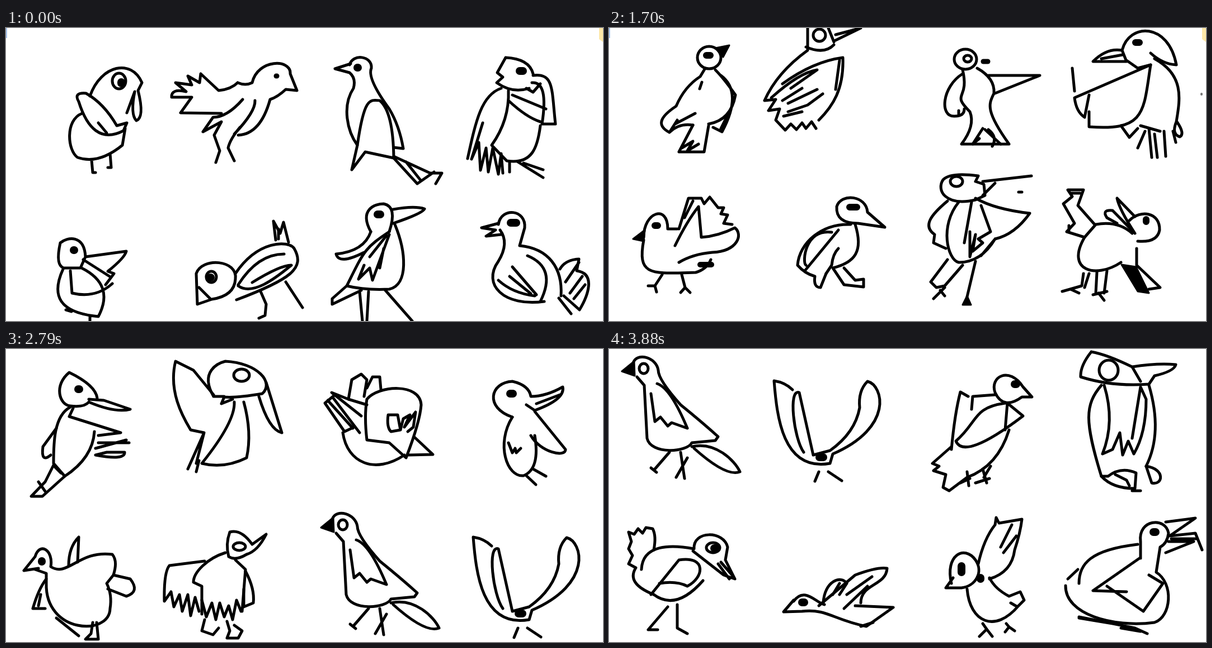
Recreate the animation shown at these times as an HTML page without scripts. Size 1067 by 525 pixels, loop 4320 ms.

```html
<!DOCTYPE html>
<html lang="en">
<head>
<meta charset="utf-8">
<title>Bird doodles</title>
<style>
html, body { margin: 0; width: 100%; height: 100%; overflow: hidden; background: #fff; }
svg { display: block; }
path, ellipse { fill: none; stroke: #000; stroke-width: 5; stroke-linecap: round; stroke-linejoin: round; }
.dot { stroke-width: 14; }
.solid { fill: #000; stroke-width: 3; }
.strip { animation: flip 4.32s step-end infinite; }
@keyframes flip {
  0% { transform: translateY(0); }
  24.3056% { transform: translateY(-525px); }
  49.537% { transform: translateY(-1050px); }
  74.7685%, 100% { transform: translateY(-1575px); }
}
</style>
</head>
<body>
<svg width="100%" height="100%" viewBox="0 0 1067 525">
<defs>
  <g id="corners">
    <path d="M0 0v18" style="stroke:#a9c6ee;stroke-width:4;stroke-linecap:butt"/>
    <path d="M1060 0h7v25l-7-5z" style="fill:#fde8a8;stroke:none"/>
  </g>
  <g id="pair">
    <path d="M583 305C590 285 625 295 628 318Q628 335 668 380Q705 410 735 437L730 444L688 448C680 465 615 470 608 440L603 345L590 330"/>
    <path d="M626 342Q650 350 680 422L652 412L645 418L632 402L622 410L615 360"/>
    <path d="M688 455C730 445 765 480 774 500Q750 510 692 458"/>
    <path d="M648 465L622 495M615 493l10 8M668 465L675 512M680 475L660 510"/>
    <path class="solid" d="M585 302L563 320L586 328Z"/>
    <ellipse cx="602" cy="315" rx="8" ry="9"/>
    <path d="M868 353Q855 340 835 337C840 400 850 500 935 485L940 468C1050 420 1030 345 1002 338Q985 355 988 385Q980 430 935 462L905 470L880 358C860 350 870 440 888 465"/>
    <path d="M915 500L908 517M932 500L956 516"/>
    <path class="dot" d="M916 474h7"/>
  </g>
</defs>
<g class="strip">

<svg width="1067" height="525">
  <use href="#corners"/>
  <path d="M150 122C170 65 225 55 243 98L236 112Q248 160 233 166Q222 155 230 114L216 152"/>
  <path d="M143 117Q120 115 130 132C145 180 170 205 210 184L216 170L198 175Q175 135 143 117M165 170l15 18"/>
  <path d="M136 153C105 165 110 220 128 232Q165 245 208 210L213 180M153 237l2 22h5M186 225l2 25h-6"/>
  <ellipse cx="202" cy="95" rx="12" ry="14"/>

  <path d="M414 98Q428 104 440 98C450 55 510 55 508 82L520 112L500 110Q485 124 472 128Q455 190 415 192"/>
  <path d="M414 98Q402 110 380 112L348 82L346 98L325 86L332 102L303 98L322 114Q295 108 296 124L332 124L312 152L385 153"/>
  <path d="M445 130Q446 150 408 190M423 128Q395 160 370 160L352 186L385 168L372 192L382 220L375 241M418 178Q400 200 397 215L408 238"/>

  <path d="M616 64L588 73L614 80Q626 90 621 108C600 140 610 185 628 210L618 254L642 222L693 233"/>
  <path d="M614 66C620 45 655 50 653 72Q645 90 685 145Q703 175 710 216L693 214"/>
  <path d="M628 210C640 125 650 128 668 130Q692 150 693 233"/>
  <path d="M693 230L758 260H779L768 279M693 233L735 279L765 258M715 240l27 34"/>

  <path d="M893 53L878 80L888 88L877 98Q905 118 935 108M893 53Q935 55 942 82"/>
  <path d="M942 85C980 80 975 110 982 172L958 172Q970 95 940 98M930 108l12 7 13-15"/>
  <path d="M885 108C850 120 840 165 825 234M898 112Q900 165 868 210L895 238C940 245 950 215 955 175M905 120L965 145M898 130Q930 160 955 168"/>
  <path d="M852 170L832 235L845 205L848 255L858 215L862 258L870 215L880 262L885 225L888 260M900 240v18M915 240L960 268M925 242L960 254"/>

  <path d="M142 410C140 370 110 374 97 385Q88 425 103 430H133L142 410L215 400Q212 412 182 436L193 440L178 460M138 415L185 445"/>
  <path d="M102 432C80 480 95 510 165 517Q195 460 135 430M115 435L118 475Q160 485 190 458M107 505l10 3M150 517v8"/>

  <path d="M342 495L340 440C350 410 415 415 410 450Q408 480 368 486ZM345 465L365 485"/>
  <ellipse cx="367" cy="446" rx="9" ry="10"/>
  <path d="M410 440C450 380 505 380 515 395C535 430 510 450 412 487"/>
  <path d="M415 460Q450 405 497 405M415 462C440 480 480 450 510 425Q490 425 440 456"/>
  <path d="M482 380L478 346L490 368L496 348L505 384M487 360v18M455 472L465 495L463 515L452 520M500 455L530 501"/>

  <path d="M652 365C630 325 660 315 675 315Q700 320 685 365M692 325Q730 318 748 324Q745 332 692 350"/>
  <path d="M652 365Q640 400 590 405Q595 425 640 402M685 365C640 395 640 400 609 462Q640 470 685 468C720 460 715 400 695 352"/>
  <path d="M685 370L655 452L650 430L630 450L640 425M680 372L650 410M675 395L668 430"/>
  <path d="M609 462L583 485V495L635 470M632 472L637 525M648 472L645 525M678 470L726 525"/>

  <path d="M880 350L850 358L875 362L858 373L885 370"/>
  <path d="M880 352C885 320 930 325 927 358L918 390C970 395 995 430 992 480M883 362Q900 385 880 418C850 460 890 500 962 490"/>
  <path d="M932 408Q985 430 955 490M905 428L948 478M900 445L938 476M880 452Q905 475 945 480"/>
  <path d="M990 432Q1000 415 1024 414L1020 435C1055 440 1040 480 1025 505L997 480M1024 420L1000 455M1030 445L1008 475M1035 460L1015 485M988 484L1010 512"/>
  <path class="dot" d="M206 97v2M628 71h1M918 77h6M121 398h1M365 447h1M664 334h5M902 349h10"/>
  <path class="dot" style="stroke-width:9" d="M483 86h1"/>
</svg>

<svg y="525" width="1067" height="525">
  <use href="#corners"/>
  <ellipse cx="179" cy="53" rx="21" ry="20"/>
  <path class="solid" d="M190 36L215 31L204 52Z"/>
  <path d="M172 72L163 87Q135 105 120 140C90 160 85 175 108 187L122 165M118 172L154 153M108 187Q125 170 150 174"/>
  <path d="M190 75Q205 90 226 120Q218 165 178 172M200 85Q240 115 202 186L186 178M215 150L200 180M166 97l-4 12"/>
  <path d="M150 174L125 222H170L178 175M130 215L150 203L140 220L160 208"/>

  <path d="M355 0V40Q300 80 278 130L298 128L285 148L305 145L298 165L315 183L325 172L335 182L345 170L352 180L362 168L370 180"/>
  <path d="M375 165C400 140 420 110 418 53Q365 60 310 100M352 34Q385 48 402 30M392 0l10 25M405 12L450 0L405 22"/>
  <ellipse cx="376" cy="13" rx="11" ry="11"/>
  <path d="M290 125Q340 80 372 75L325 108M310 130L345 108M320 135L372 110M320 150L355 138L382 118M312 158L345 150M412 58L405 110"/>

  <ellipse cx="637" cy="56" rx="20" ry="18"/>
  <ellipse cx="641" cy="55" rx="7" ry="6"/>
  <path d="M632 75C645 130 610 115 645 150Q655 175 630 208H715C670 145 680 135 688 117Q690 90 658 72"/>
  <path d="M632 82C595 105 590 160 618 158Q635 158 635 145M625 148v8M678 85H770L690 117"/>
  <path d="M668 180L650 208L662 198M672 182L700 208M678 182Q695 195 685 212"/>
  <path style="stroke-width:9" d="M669 60h8"/>

  <path d="M917 40C930-10 1000-10 1014 66Q990 65 968 45M917 40Q890 35 865 60H925L917 40M880 55l38-7M925 58L945 72L968 66"/>
  <path d="M968 66L832 125Q835 150 850 160L858 120M858 150V177C960 185 955 150 968 66M828 72L832 113"/>
  <path d="M975 55C1030 85 1020 130 1014 168Q1005 190 1020 195Q1030 190 1015 168"/>
  <path d="M915 175L930 196L945 180M958 185L945 215M965 180L970 232M975 190L980 232M992 185L995 230M1008 185l5 20M950 175L985 185"/>
  <path d="M1059 118v1" style="stroke:#777;stroke-width:4"/>

  <path d="M62 375C62 330 105 315 105 360H122M62 380C50 445 75 440 155 438Q175 432 182 415"/>
  <path d="M125 420Q150 405 185 402C230 400 240 370 225 358Q195 373 165 375L160 320Q140 345 118 390"/>
  <path d="M125 360L142 305H165L170 315L180 303L195 322H205L200 333L212 335L205 350L220 352M135 340L150 310"/>
  <path class="solid" d="M64 362L43 378L62 382Z"/>
  <path d="M95 442L82 462H70M82 462l3 11M130 442L136 465L128 474M136 465l9 9"/>
  <path style="stroke-width:10" d="M163 424h20"/>

  <path d="M407 320C415 295 460 300 462 330L493 357L445 350Q405 350 407 320"/>
  <path d="M432 352C380 350 340 385 337 425Q350 440 368 445Q365 465 378 465L388 440"/>
  <path d="M440 352C455 400 440 420 400 430L420 460L455 464V450L440 452L420 430"/>
  <path d="M410 362L350 435M398 366C350 360 345 420 352 425M410 395Q400 405 398 425L388 440"/>

  <path d="M655 308C600 320 585 290 597 272Q610 258 660 265L655 275L670 280L672 300L655 308"/>
  <path d="M668 275L755 265M690 278L668 300M732 294h6"/>
  <path d="M605 310C575 335 560 355 582 370L580 385L602 395M625 312C590 355 605 415 625 420Q665 420 690 378M655 305Q690 325 752 332Q725 370 690 378L665 408"/>
  <path d="M648 312L635 385M665 318L682 365L660 378L668 385L650 400L655 370L645 410V365"/>
  <path d="M605 415L575 455L585 465L600 462L632 425M600 465L580 485M592 470l8 10M655 418L638 490"/>
  <ellipse cx="621" cy="275" rx="11" ry="9"/>
  <path class="solid" d="M640 480l7 16h-15z"/>

  <path d="M850 375L818 365L832 350L812 315L828 302L820 290H848L838 318L868 352M824 296h18M822 354v10"/>
  <path d="M850 375C815 435 870 450 915 420M850 375L870 352Q910 345 935 368"/>
  <path d="M930 345C950 325 985 330 984 362Q980 385 945 382M940 338L908 305Q912 325 940 368L900 327Q880 325 890 340L908 350"/>
  <path d="M943 395V425L985 465L965 468"/>
  <path class="solid" d="M916 424L942 428L965 475L945 472Z"/>
  <path d="M848 440L845 462L810 472M858 440L850 465M840 475L825 468M872 438L870 475M890 435L885 475M865 478L890 472M875 475l10 13"/>
  <path class="dot" style="stroke-width:12" d="M174 49h7M941 26h7M82 354h5M430 321h13M960 343v4"/>
</svg>

<svg y="1050" width="1067" height="525">
  <path d="M163 88Q160 65 113 42C85 65 95 100 115 102Q140 105 148 95M148 90L175 92L222 108Q195 115 148 95"/>
  <path d="M115 104C85 120 85 170 85 205L105 228Q155 195 158 148M120 106L113 121L205 150L165 155"/>
  <path d="M90 142L66 175Q62 205 80 190M160 178L215 163M165 168H220M160 190L180 185H212Q213 200 160 190"/>
  <path d="M85 208L70 238L45 264H65L105 228M88 212l10 10M58 238l12 17"/>

  <path d="M371 82L335 38L303 22C290 75 315 120 330 145L354 150L325 215M354 150L340 205M345 200L340 220"/>
  <path d="M371 85C345 40 380 25 392 22C450 25 480 60 458 80Q410 88 390 86L385 98L405 90M371 85H390"/>
  <path d="M465 60L493 150Q470 145 452 85M408 95Q410 130 350 205Q390 215 430 195Q440 150 425 95"/>
  <ellipse cx="421" cy="47" rx="14" ry="11"/>

  <path d="M645 90C665 65 740 60 742 100Q740 130 715 195L685 168L645 163Q640 120 645 90M730 158L763 189L718 190"/>
  <path d="M700 118H683Q680 140 688 148L705 145ZM705 145L710 125L722 118L712 140L732 113L728 140L718 148"/>
  <path d="M602 150C610 205 660 225 712 190M645 100L612 90L618 55L635 45L645 55L640 85M645 70L655 50H668L670 72"/>
  <path d="M612 90L582 78L635 120M588 82L570 97L605 148L622 140M575 92L620 142M585 88L632 150"/>

  <path d="M905 122C855 105 865 60 905 58Q935 65 938 85Q965 85 995 68Q1000 90 945 110L930 100M948 98L990 82"/>
  <path d="M905 122C875 170 895 230 925 227Q955 215 945 155M945 112L1000 180C1000 195 955 185 938 155"/>
  <path d="M898 168l7 18 5-8 2 8 8-8M930 227l17 16M942 215l23 13"/>

  <path d="M52 372C60 345 85 360 80 390C110 410 130 360 190 368Q200 380 192 405M52 372L32 397L58 393"/>
  <path d="M52 395L72 402V420C70 510 185 515 186 465Q190 440 180 420L192 405L222 412Q240 435 215 443L182 430"/>
  <path d="M112 388Q112 355 130 337L128 382M72 412Q58 430 48 465H70M62 440l-4 20"/>
  <path d="M90 482L130 514M155 490L152 510L142 520H165L162 490"/>

  <path d="M398 372Q392 350 400 328Q420 322 440 350L465 332Q450 362 430 368Q410 380 398 372"/>
  <ellipse cx="417" cy="354" rx="11" ry="7"/>
  <path d="M392 365C360 375 335 400 335 418L350 425V475M410 378L428 395L422 470"/>
  <path d="M355 380L292 388Q282 400 283 452L295 435L300 462L310 440L315 470L325 440L330 478L338 445L345 470"/>
  <path d="M428 398Q445 430 442 455L425 462V430M350 450L358 480L368 455L375 485L382 455L390 480L398 460L405 485L412 450L420 470"/>
  <path d="M355 485L350 505L370 512L380 500M395 488L400 505L395 518H415L422 505L408 495"/>
  <use href="#pair"/>
  <path class="dot" d="M129 72h2M901 80h5M64 380v1"/>
</svg>

<svg y="1575" width="1067" height="525">
  <use href="#pair" x="-540" y="-280"/>
  <path d="M690 78C680 50 715 30 740 68L756 86H738Q705 110 690 78"/>
  <path d="M690 82L650 85L648 108M642 85L628 77Q618 115 612 180M708 97C650 105 660 130 620 165Q635 200 740 120L712 97L708 145"/>
  <path d="M715 145Q695 210 640 230L608 254L597 248L602 225L580 218L590 210L578 205L612 175"/>
  <path d="M640 220l3 25M628 240l17-8M668 215l7 25M655 240l25-8M682 210l-12 20"/>

  <path d="M862 5Q842 30 843 50Q900 68 965 63L975 48Q1010 40 1013 28Q980 25 935 32Q890 10 862 5M935 32L950 58"/>
  <path d="M880 65C850 100 850 130 880 228M885 65Q905 130 882 188L900 180L913 150L918 190L928 165L938 188Q960 150 960 90L950 68L935 160"/>
  <path d="M965 65Q990 150 960 210M880 228Q900 250 940 250L942 222Q915 210 892 228H880M905 225L925 235L930 245"/>
  <path d="M960 210C995 215 990 245 970 240L960 210M950 254h-15"/>
  <ellipse cx="893" cy="38" rx="17" ry="18"/>

  <path d="M80 360Q85 335 78 322L66 320L60 330L52 322L45 332L35 328L40 345L35 358L42 370L35 385L48 392Q30 420 80 440"/>
  <path d="M58 395C60 350 110 350 152 358C150 325 205 325 212 355L208 378L225 412L205 405L150 362M195 385l20 27M200 382l20 23"/>
  <path d="M75 440L125 378C175 370 170 410 140 425Q120 415 90 420M80 440Q120 470 168 415M105 462L70 503H87M122 458V500L140 510"/>
  <ellipse cx="186" cy="356" rx="12" ry="9"/>

  <path d="M330 450L312 471L345 470C390 465 400 485 460 497L508 463L440 460M330 452C350 425 370 455 385 458"/>
  <path d="M383 455C385 415 415 405 425 420M400 440l12-20M412 440l13-20M450 497l22-7"/>
  <path d="M375 460L440 405Q480 390 497 393C495 425 450 420 450 455M420 465L462 425M425 440L470 408"/>

  <path d="M612 420C600 370 635 350 655 378C670 400 655 425 630 428H602L615 410"/>
  <path d="M660 385Q670 340 690 315L692 302L697 312L738 305Q735 330 725 360Q720 400 680 412M720 315L700 355M728 335L705 365"/>
  <path d="M640 430C645 490 690 510 732 460M680 410Q690 430 715 443L735 435L742 450L730 462L718 455"/>
  <path d="M668 492l7 10-13 13M675 502l10 13M710 492l5 6-7 9M715 498l10 7"/>

  <path d="M950 375V345C945 305 995 300 1000 330Q998 348 985 355L978 400C1010 420 1005 480 975 490C900 500 815 475 816 424"/>
  <path d="M995 310L1048 303L1002 335L1048 330L1060 360M1005 340h45M1000 345h45L995 365"/>
  <path d="M945 350C860 360 840 385 840 420M820 412l18-17M948 375L865 433L925 435M890 425L955 470L990 420L965 405"/>
  <path d="M840 480L940 500L962 510M840 482L900 492M915 500l35 6"/>
  <path class="dot" d="M725 63h3M188 357h2M345 454h4M630 389v11M664 410v2M973 328h4"/>
</svg>

</g>
</svg>
</body>
</html>
```
